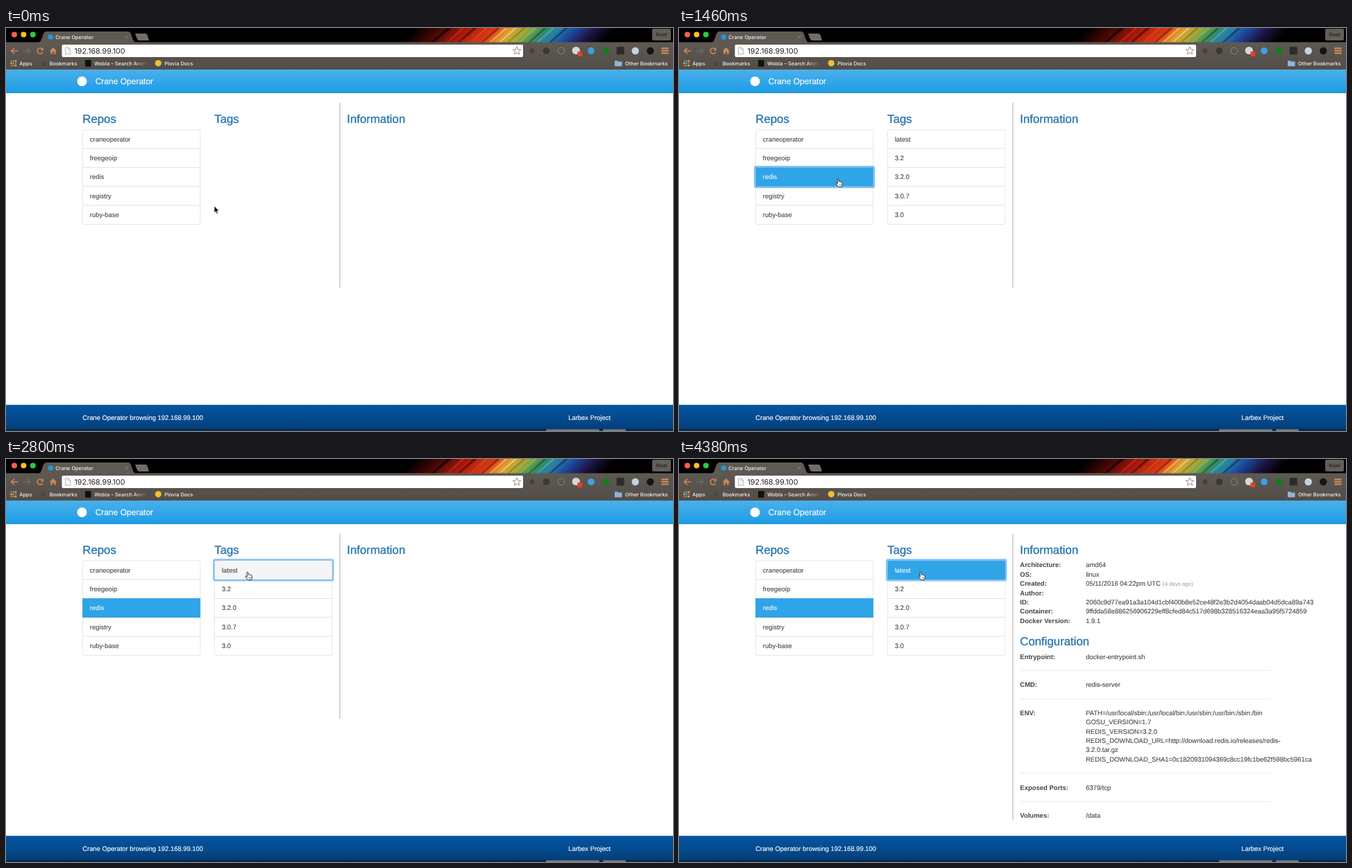
An HTML page that plays this animation: 961 by 582 pixels, repeating every 4400 ms.

```html
<!DOCTYPE html>
<html lang="en">
<head>
<meta charset="utf-8">
<title>Crane Operator</title>
<style>
html, body { margin: 0; width: 100%; height: 100%; overflow: hidden; background: #fff; }
svg { display: block; width: 961px; height: 582px; text-rendering: geometricPrecision; }
text { font: 9.44px "Liberation Sans", Arial, sans-serif; fill: #444; stroke: #444; stroke-width: .1px; white-space: pre; }
.h { font-size: 16.8px; fill: #2877b0; stroke: #2877b0; stroke-width: .35px; }
.b { font-size: 9.5px; font-weight: bold; stroke: none; }
.small { font-size: 7.9px; fill: #999; stroke: none; }
.brand { font-size: 12px; fill: #fff; stroke: #fff; stroke-width: .15px; }
.foot { fill: #fff; stroke: #fff; stroke-width: .15px; }
.ui { font: 500 7.4px Inter, Roboto, sans-serif; fill: #f4f2ef; stroke: none; }
.url { font: 10.7px Inter, Roboto, sans-serif; fill: #222; stroke: none; }
.row rect { fill: #fff; stroke: #ddd; stroke-width: .7px; }
.row.hover rect { fill: #f5f5f5; }
.row.active rect { fill: #2fa4e7; stroke: #2fa4e7; }
.row.active text { fill: #fff; stroke: #fff; }
.ring { fill: none; stroke: #86c0f5; stroke-width: 2.5px; }
.line { fill: none; stroke: #d0875c; stroke-width: 1.6px; }
</style>
</head>
<body>
<svg viewBox="0 0 961 582" xmlns="http://www.w3.org/2000/svg">
  <defs>
    <linearGradient id="nav" x2="0" y2="1">
      <stop stop-color="#4bb0ea"/><stop offset=".6" stop-color="#2fa4e7"/><stop offset="1" stop-color="#1d9ce5"/>
    </linearGradient>
    <linearGradient id="foot" x2="0" y2="1">
      <stop stop-color="#0455a2"/><stop offset=".6" stop-color="#04488b"/><stop offset="1" stop-color="#033b70"/>
    </linearGradient>
    <linearGradient id="bar" x2="0" y2="1">
      <stop stop-color="#5e5953"/><stop offset="1" stop-color="#524d48"/>
    </linearGradient>
    <linearGradient id="glow" gradientUnits="userSpaceOnUse" x1="590" x2="880" y1="0" y2="0" gradientTransform="skewX(-45)">
      <stop stop-color="#000"/><stop offset=".14" stop-color="#4c0806"/><stop offset=".28" stop-color="#b01c0e"/>
      <stop offset=".4" stop-color="#d83c16"/><stop offset=".48" stop-color="#e0a030"/>
      <stop offset=".56" stop-color="#a5a838"/><stop offset=".64" stop-color="#3a8f58"/>
      <stop offset=".72" stop-color="#2480a8"/><stop offset=".8" stop-color="#1d479c"/>
      <stop offset=".9" stop-color="#1c1440"/><stop offset="1" stop-color="#000"/>
    </linearGradient>
    <linearGradient id="fade">
      <stop stop-color="#544f4a" stop-opacity="0"/><stop offset="1" stop-color="#544f4a"/>
    </linearGradient>
    <clipPath id="strip"><path d="M0 0H961V21H0z"/></clipPath>
  </defs>
  <g id="page"></g>
  <g id="chrome"></g>
  <g id="arrow"><path d="M0 0V10L2.3 7.9L3.9 11.6L5.6 10.9L4 7.3H7.1z" fill="#111" stroke="#fff" stroke-width=".7"/></g>
  <g id="hand"><path d="M-1 .8C-1-.4 .9-.4 1 .8L1.4 4C2 3.3 3 3.5 3.1 4.3C3.8 3.7 4.8 4 4.9 4.8C5.8 4.4 6.5 5 6.5 5.8L6.3 8.6L5.4 11.4H.8L-1.8 8.2L-3 6.5C-3 5.4-1.8 5.3-.5 6.8z"
    fill="#fff" stroke="#222" stroke-width=".9" stroke-linejoin="round"/><path d="M1.9 7.2V9.7M3.3 7.2V9.7M4.6 7.2V9.7" stroke="#444" stroke-width=".5"/></g>
</svg>
<script>
const LOOP = 4400;
const TOP = 146.75, STEP = 27.35, ROW_W = 169.4;
const COLS = [
  { x: 110.45, rows: ["craneoperator", "freegeoip", "redis", "registry", "ruby-base"] },
  { x: 300.6, rows: ["latest", "3.2", "3.2.0", "3.0.7", "3.0"] }
];
// time, x, y of the pointer tip
const PATH = [[0, 300, 257], [150, 300, 257], [700, 229, 218], [1600, 229, 218],
  [2250, 346, 167], [2380, 346, 167], [2560, 348, 163.3], [LOOP, 348, 163.3]];
const AT = { focusRepo: 780, repo: 1040, focusTag: 2700, tag: 2820, info: 3520 };

const $ = id => document.getElementById(id);
const text = (x, y, s, cls = "", extra = "") => `<text x="${x}" y="${y}" class="${cls}" ${extra}>${s}</text>`;
const rect = (x, y, w, h, fill, r = 0) => `<rect x="${x}" y="${y}" width="${w}" height="${h}" rx="${r}" fill="${fill}"/>`;
const dot = (x, y, r, fill) => `<circle cx="${x}" cy="${y}" r="${r}" fill="${fill}"/>`;
const path = (d, attrs) => `<path d="${d}" ${attrs}/>`;

function listHtml({ x, rows }, id) {
  const items = rows.map((s, i) => {
    const y = TOP + i * STEP;
    return `<g class="row">${rect(x, y, ROW_W, STEP, "#fff", i % 4 ? 0 : 2)}${text(x + 10.4, y + 16.9, s)}</g>`;
  });
  return `<g id="list${id}">${items.join("")}</g>`;
}

function ringHtml(col, i, id) {
  return `<rect id="${id}" class="ring" x="${COLS[col].x - 1.2}" y="${TOP + i * STEP - 1.2}"
    width="${ROW_W + 2.4}" height="${STEP + 2.4}" rx="2"/>`;
}

function infoHtml() {
  const pairs = [
    [156.4, "Architecture:", "amd64"],
    [169.8, "OS:", "linux"],
    [183.2, "Created:", "05/11/2016 04:22pm UTC"],
    [196.5, "Author:"],
    [209.9, "ID:", "2060c9d77ea91a3a104d1cbf400b8e52ce48f2e3b2d4054daab04d5dca89a743"],
    [223.2, "Container:", "9ffdda58e886256906229eff8cfed84c517d698b328516324eaa3a95f5724859"],
    [236.6, "Docker Version:", "1.9.1"],
    [288.6, "Entrypoint:", "docker-entrypoint.sh"],
    [329.3, "CMD:", "redis-server"],
    [370, "ENV:", "PATH=/usr/local/sbin:/usr/local/bin:/usr/sbin:/usr/bin:/sbin:/bin",
      "GOSU_VERSION=1.7", "REDIS_VERSION=3.2.0",
      "REDIS_DOWNLOAD_URL=http://download.redis.io/releases/redis-", "3.2.0.tar.gz",
      "REDIS_DOWNLOAD_SHA1=0c1820931094369c8cc19fc1be62f598bc5961ca"],
    [477.5, "Exposed Ports:", "6379/tcp"],
    [518.3, "Volumes:", "/data"]
  ];
  const lines = pairs.map(([y, label, ...values]) =>
    text(491.3, y, label, "b") + values.map((v, i) => text(586.2, y + i * 13.35, v)).join(""));
  const rules = [305.2, 346, 453.3, 494].map(y => rect(491, y, 361, .8, "#e6e6e6"));
  return `<g id="info">${lines.join("")}${rules.join("")}${text(697, 183.2, "(4 days ago)", "small")}${
    text(491.3, 268.8, "Configuration", "h")}</g>`;
}

function spinnerHtml() {
  let s = "";
  for (let i = 0; i < 12; i++)
    s += `<rect x="5.6" y="-1.35" width="5.8" height="2.7" rx="1.2" fill="#e8120c" transform="rotate(${i * 30})"/>`;
  return `<g id="spinner" transform="translate(671.6 241.7)">${s}</g>`;
}

function pageHtml() {
  return rect(0, 60, 961, 522, "#fff") + rect(0, 60, 961, 34, "url(#nav)") +
    rect(0, 93.3, 961, .75, "#178acc") +
    dot(109.5, 77, 7, "#fff") + text(128.7, 81.2, "Crane Operator", "brand") +
    text(110.3, 136.7, "Repos", "h") + text(300.3, 136.7, "Tags", "h") + text(491.3, 136.7, "Information", "h") +
    COLS.map(listHtml).join("") + ringHtml(0, 2, "ringRepo") + ringHtml(1, 0, "ringTag") +
    `<rect id="divider" x="480.4" y="108" width="1.1" height="267" fill="#b4b4b4"/>` +
    infoHtml() + spinnerHtml() +
    rect(0, 544.2, 961, 37.8, "url(#foot)") + rect(0, 579, 961, 3, "#072b4c") +
    rect(778, 579.6, 77, 2.4, "#777d84", 1) + rect(860, 579.6, 33, 2.4, "#777d84", 1) +
    text(110.2, 565.8, "Crane Operator browsing 192.168.99.100", "foot") +
    text(871, 565.8, "Larbex Project", "foot", 'text-anchor="end"');
}

function stripHtml() {
  let s = rect(0, 0, 961, 21, "#000") + path("M569 21L590 0H880L859 21z", 'fill="url(#glow)"');
  const streaks = [[612, 7, "#000"], [634, 4, "#e0301c"], [650, 6, "#3c0604"], [668, 3, "#f0512a"],
    [684, 5, "#7c1208"], [696, 4, "#ffd070"], [710, 3, "#fff0a0"], [722, 4, "#6c7420"],
    [738, 4, "#7cc87c"], [752, 4, "#124838"], [764, 4, "#58b8d8"], [782, 5, "#10244c"]];
  for (const [x, w, c] of streaks)
    s += path(`M${x} 21L${x + 23} 0h${w}L${x + w * .6} 21z`, `fill="${c}" opacity=".6"`);
  return `<g clip-path="url(#strip)">${s}</g>`;
}

function chromeHtml() {
  let s = stripHtml() + rect(0, 20.5, 961, 39.5, "url(#bar)") +
    path("M47 21C53 20 52 5 58 5H176C182 5 181 20 187 21z", 'fill="#5e5953"') +
    path("M186 8H201Q203 8 204 11L206 18H192Q190 18 189 16z", 'fill="#716c67"');
  ["#fc5b57", "#fdbc2f", "#2fc840"].forEach((c, i) => s += dot(12 + i * 13.4, 9.6, 4, c));
  s += dot(64.3, 13, 3.8, "#2496d8") + text(71.2, 15.7, "Crane Operator", "ui") +
    path("M171.3 11l4.4 4.4m0-4.4l-4.4 4.4", 'stroke="#8d8882" stroke-width=".9"') +
    rect(931, 1, 27, 17, "#625e5a", 2) + text(944.5, 12.4, "Noel", "ui", 'text-anchor="middle" style="fill:#252321"');

  // navigation buttons
  s += path("M17.5 33H8M12 28.8L7.7 33L12 37.2", 'class="line"') +
    path("M25 33H34.5M30.5 28.8L34.8 33L30.5 37.2", 'class="line" style="stroke:#706a64"') +
    path("M52.7 35A4 4 0 1 1 52 30.2", 'class="line"') + path("M53.8 28V32.4H49.5z", 'fill="#d0875c"') +
    path("M62.8 33.2L68 28L73.2 33.2H71.7V37.8H69.2V34.5H66.8V37.8H64.3V33.2z", 'fill="#d0875c"') +
    rect(80.5, 24, 664.5, 18, "#fff", 2) +
    path("M85.5 28H90L93 31V38H85.5zM90 28V31H93", 'fill="#f5f5f5" stroke="#aaa" stroke-width=".8"') +
    text(98.5, 36.6, "192.168.99.100", "url") +
    path("M736 27L737.6 31L741.8 31.2L738.5 33.9L739.7 38L736 35.7L732.3 38L733.5 33.9L730.2 31.2L734.4 31z",
      'fill="#fff" stroke="#777" stroke-width=".8"');

  // extensions
  s += dot(758, 33, 3.6, "#46413d") + dot(778.5, 33, 4.8, "#3b3734") +
    `<circle cx="800" cy="33" r="4.8" fill="none" stroke="#8c8781"/>` +
    dot(821.3, 32.5, 5.6, "#d5d8da") + rect(823.5, 34, 6.8, 7, "#e2402c", 1) +
    dot(843, 33, 4.9, "#3e9fe4") + dot(864.3, 33, 4.9, "#137d1b") + rect(879.7, 27.3, 11, 11, "#2b2b2b", 1) +
    dot(906.7, 33, 5.2, "#c5d2e4") + dot(928.3, 33, 5.2, "#151515") +
    [28.3, 31.8, 35.3].map(y => rect(944.2, y, 10.5, 2.2, "#d0875c", .6)).join("");

  // bookmarks
  const tiles = ["#e8574b", "#4d9be8", "#f0b93a", "#54b868"];
  for (let i = 0; i < 9; i++) {
    const col = i % 3, row = i / 3 | 0;
    s += rect(6.5 + col * 3.2, 46.6 + row * 3.2, 2.3, 2.3, tiles[(i * 3 + row) % 4]);
  }
  s += text(19.3, 53.6, "Apps", "ui") +
    path("M54 46.8l1.2 3 3.2.2-2.5 2 .9 3.1-2.8-1.8-2.8 1.8.9-3.1-2.5-2 3.2-.2z", 'fill="#48433f"') +
    text(62.7, 53.6, "Bookmarks", "ui") +
    rect(114, 46.2, 8.6, 9.6, "#111") + text(127.3, 53.6, "Wobla – Search Anim", "ui") +
    rect(185, 45, 18, 12, "url(#fade)") + rect(203, 45, 9, 12, "#544f4a") +
    dot(219.3, 50.8, 4.6, "#efc033") + text(228.2, 53.6, "Plovia Docs", "ui") +
    path("M877 47.3h4l1.2 1.3h5.3v6.6H877z", 'fill="#8fb6d6"') +
    text(953.6, 53.6, "Other Bookmarks", "ui", 'text-anchor="end"');
  return s;
}

$("page").innerHTML = pageHtml();
$("chrome").innerHTML = chromeHtml();
const lists = COLS.map((c, i) => [...$("list" + i).children]);
const petals = [...$("spinner").children];
const show = (id, on) => $(id).style.display = on ? "" : "none";
const ease = p => p * p * (3 - 2 * p);

function pointer(t) {
  const i = PATH.findIndex(p => p[0] > t);
  const [t0, x0, y0] = PATH[i - 1], [t1, x1, y1] = PATH[i];
  const p = ease((t - t0) / (t1 - t0));
  return [x0 + (x1 - x0) * p, y0 + (y1 - y0) * p];
}

function draw(t) {
  const [x, y] = pointer(t);
  const active = [t >= AT.repo ? 2 : -1, t >= AT.tag ? 0 : -1];
  const visible = [true, t >= AT.repo];
  let over = false;
  COLS.forEach((col, c) => {
    const inside = visible[c] && x >= col.x && x <= col.x + ROW_W;
    const hot = inside ? Math.floor((y - TOP) / STEP) : -1;
    if (hot >= 0 && hot < 5) over = true;
    lists[c].forEach((row, i) => {
      row.setAttribute("class", "row" + (i === active[c] ? " active" : i === hot ? " hover" : ""));
      // keep the active border above its neighbours
      if (i === active[c] && row.nextSibling) row.parentNode.append(row);
    });
  });
  show("list1", visible[1]);
  show("ringRepo", t >= AT.focusRepo && t < AT.focusTag);
  show("ringTag", t >= AT.focusTag);
  show("info", t >= AT.info);
  show("spinner", t >= AT.tag && t < AT.info);
  $("divider").setAttribute("height", t >= AT.info ? 413.5 : 267);

  const head = (t - 3240) / 1000;
  petals.forEach((p, i) => {
    const age = ((head - i / 12) % 1 + 1) % 1;
    p.setAttribute("opacity", Math.max(.25, 1 - age / .6 * .75));
  });

  show("arrow", !over);
  show("hand", over);
  $(over ? "hand" : "arrow").setAttribute("transform", `translate(${x} ${y})`);
}

const start = performance.now();
function tick() {
  draw((performance.now() - start) % LOOP);
  requestAnimationFrame(tick);
}
tick();
</script>
</body>
</html>
```
